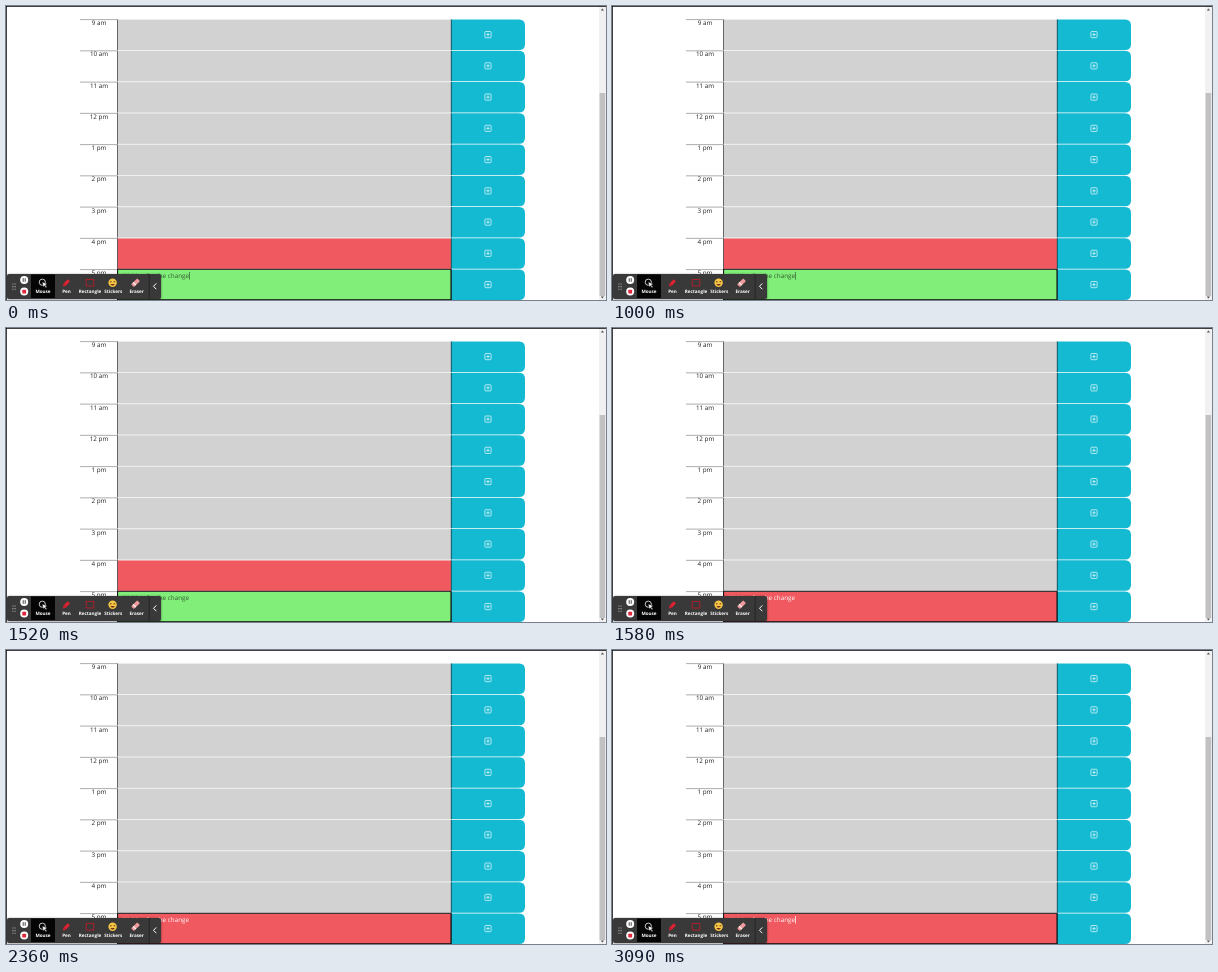
These frames come from a looping animation (600 px wide and 294 px high, 3.12 s). An HTML page:

```html
<!DOCTYPE html>
<html lang="en">
<head>
<meta charset="utf-8">
<title>Day planner</title>
<style>
  html, body { margin: 0; width: 100%; height: 100%; overflow: hidden; background: #fff; }
  svg { display: block; width: 600px; height: 294px; }
  text { font-family: "Open Sans", "Noto Sans", sans-serif; text-rendering: geometricPrecision; }
  .hour { font-size: 6.3px; fill: #222; text-anchor: middle; }
  .note { font-size: 6.3px; fill: #345a35; }
  .tool { font-size: 4.6px; font-weight: 700; fill: #fff; text-anchor: middle; }
  .past { fill: #d2d2d2; }
  .present { fill: #f0595f; }
  .future { fill: #80ee78; }
  .four, .five, .note, .caret { animation: 3120ms step-end infinite; }
  .four { animation-name: pass; }
  .five { animation-name: arrive; }
  .note { animation-name: ink; }
  .caret { fill: #345a35; animation-name: ink, blink; }
  /* the hour turns at 1580 ms */
  @keyframes pass { 0% { fill: #f0595f; } 50.641% { fill: #d2d2d2; } }
  @keyframes arrive { 0% { fill: #80ee78; } 50.641% { fill: #f0595f; } }
  @keyframes ink { 0% { fill: #345a35; } 50.641% { fill: #fff; } }
  /* 360, 880, 1360, 1880, 2360, 2880 ms */
  @keyframes blink {
    0%, 28.205%, 60.256%, 92.308% { opacity: 1; }
    11.538%, 43.59%, 75.641% { opacity: 0; }
  }
</style>
</head>
<body>
<svg viewBox="0 0 600 294">
  <defs>
    <g id="save">
      <path d="M445 .5H513Q519 .5 519 6.5V25Q519 31 513 31H445Z" fill="#14b9d2"/>
      <path d="M445.3 .5V31" stroke="#163c44" stroke-width=".8"/>
      <rect x="478.9" y="12.5" width="6.2" height="6.2" rx=".8" fill="none" stroke="#d9f5f8" stroke-width=".8"/>
      <path d="M480.3 15.6H483.7M482 13.9V17.3" stroke="#d9f5f8" stroke-width=".8"/>
    </g>
    <filter id="soft" x="-10%" y="-30%" width="120%" height="160%">
      <feGaussianBlur stdDeviation="1.2"/>
    </filter>
  </defs>
  <rect width="600" height="294" fill="#fff"/>
  <g id="rows"></g>

  <rect x="111.6" y="263.3" width="333.4" height="30.4" fill="none" stroke="#111" stroke-width="1"/>
  <text class="note" x="183" y="272" text-anchor="end">Waiting for the change</text>
  <rect class="caret" x="183" y="266" width=".7" height="7.6"/>

  <!-- scrollbar and window edge -->
  <rect x="593" width="7" height="294" fill="#f1f1f1"/>
  <rect x="593.6" y="87" width="5.6" height="203" fill="#c1c1c1"/>
  <path d="M594.8 4.5L596.4 2.5L598 4.5Z M594.8 290.5L596.4 292.5L598 290.5Z" fill="#505050"/>
  <path d="M0 .4H600M.4 0V294" stroke="#111" stroke-width=".9" fill="none"/>

  <!-- drawing toolbar -->
  <rect x="1" y="268.5" width="154" height="25" rx="2" fill="#000" opacity=".5" filter="url(#soft)"/>
  <rect x="1" y="268" width="154" height="25" rx="2" fill="#393939"/>
  <rect x="25" y="268.5" width="24" height="23.5" fill="#050505"/>
  <path d="M143.2 268V293" stroke="#222" stroke-width=".8"/>
  <path d="M6.9 277.5V284M9.1 277.5V284" stroke="#aaa" stroke-width="1.1" stroke-dasharray="1.1 1.5"/>
  <circle cx="18.2" cy="274" r="4" fill="#fff"/>
  <path d="M17.2 272.2V275.8M19.2 272.2V275.8" stroke="#333" stroke-width=".9"/>
  <circle cx="18.2" cy="285.6" r="4" fill="#fff"/>
  <rect x="16.3" y="283.7" width="3.8" height="3.8" rx=".6" fill="#e0273c"/>
  <circle cx="36.3" cy="276.2" r="3.1" fill="none" stroke="#ddd" stroke-width=".9"/>
  <path d="M36.3 276L41.3 278.1L39.3 279L41 281L40 281.7L38.5 279.7L37.3 281.1Z" fill="#fff" stroke="#050505" stroke-width=".4"/>
  <g fill="#dc2332">
    <path d="M57 280.5L57.6 277.5L61.7 273.2L64 275.4L59.8 279.7Z"/>
    <path d="M58 277.6L59.8 279.5" stroke="#7c1119" stroke-width=".6"/>
  </g>
  <rect x="80.2" y="273.4" width="7.6" height="6.6" fill="none" stroke="#b51d2a" stroke-width=".9"/>
  <circle cx="106.6" cy="276.8" r="4.2" fill="#f6c644"/>
  <path d="M104 275.8H105.6M107.6 275.8H109.2" stroke="#5b3718" stroke-width="1"/>
  <path d="M104.3 278Q106.6 281.4 108.9 278Z" fill="#71351f"/>
  <g transform="rotate(-45 129.5 276.7)">
    <rect x="125.2" y="274.8" width="8.6" height="3.9" rx=".8" fill="#ef9b9e"/>
    <path d="M128 274.8V278.7" stroke="#fff" stroke-width="1.2"/>
  </g>
  <g id="tools"></g>
  <path d="M150.3 277.4L147.5 280.3L150.3 283.2" fill="none" stroke="#fff" stroke-width="1"/>
</svg>
<script>
  const hours = ['9 am', '10 am', '11 am', '12 pm', '1 pm', '2 pm', '3 pm', '4 pm', '5 pm'];
  const pitch = 31.25;
  const kind = i => i < 7 ? 'past' : i === 7 ? 'present four' : 'future five';

  document.getElementById('rows').innerHTML = hours.map((hour, i) => `
    <g transform="translate(0 ${13 + i * pitch})">
      <rect class="${kind(i)}" x="111.5" y=".4" width="333.5" height="30.9"/>
      <path d="M111.5 .3H445" stroke="#f4f4f4" stroke-width=".7"/>
      <path d="M74 .6H111" stroke="#999" stroke-width=".8"/>
      <path d="M111.5 .4V31.2" stroke="#444" stroke-width=".8"/>
      <text class="hour" x="93" y="6">${hour}</text>
      <use href="#save"/>
    </g>`).join('');

  const tools = { Mouse: 37, Pen: 60.5, Rectangle: 84, Stickers: 107.3, Eraser: 130.7 };
  document.getElementById('tools').innerHTML = Object.entries(tools)
    .map(([name, x]) => `<text class="tool" x="${x}" y="287">${name}</text>`).join('');
</script>
</body>
</html>
```
